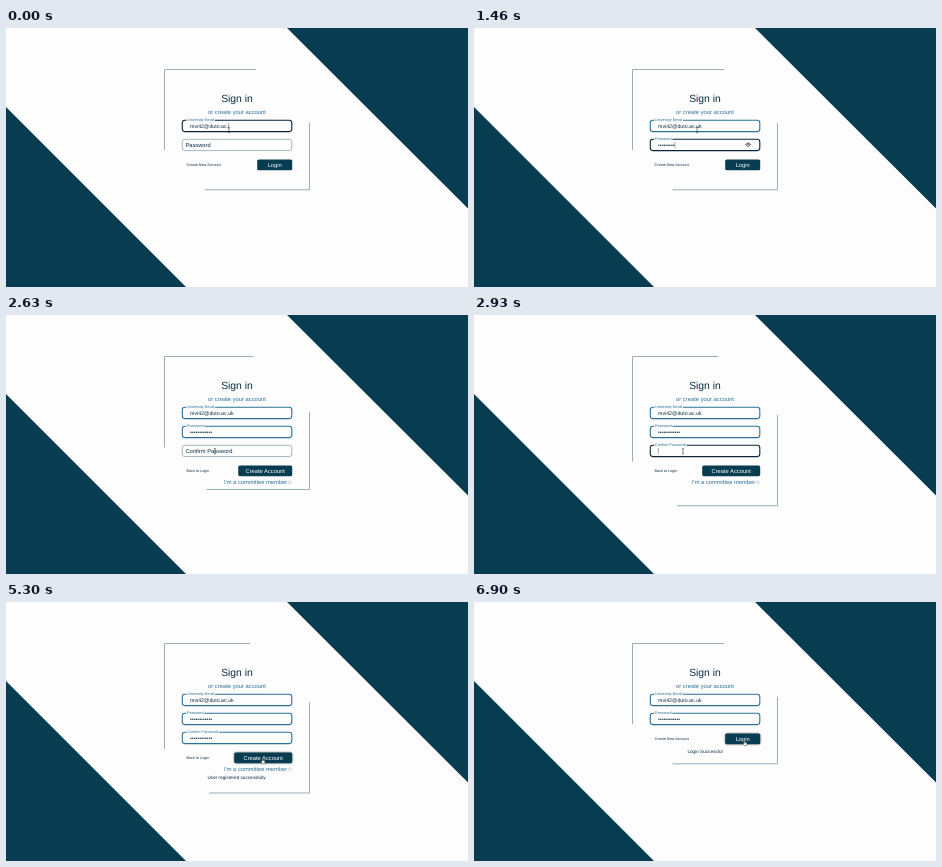
Recreate the animation shown at these times as an HTML page. Size 462 by 259 pixels, loop 7300 ms.

```html
<!DOCTYPE html>
<html lang="en">
<head>
<meta charset="utf-8">
<title>Sign in</title>
<style>
html, body { margin: 0; width: 100%; height: 100%; overflow: hidden; background: #fdfdfd; }
svg { display: block; width: 462px; height: 259px; }
text { font-family: "Liberation Sans", Arial, sans-serif; fill: #0a2f42; text-rendering: geometricPrecision; white-space: pre; }
.blue { fill: #2c7099; }
.mid { text-anchor: middle; }
.label { paint-order: stroke; stroke: #fdfdfd; stroke-width: 2; }
.hover { filter: drop-shadow(0 .8px 1px #0008); }
</style>
</head>
<body>
<svg viewBox="0 0 462 259">
  <path d="M281 0H462V180.500ZM0 79L180 259H0Z" fill="#083c50"/>
  <path id="frame" fill="none" stroke="#8fa6b3" stroke-width=".9"/>
  <text class="mid" x="231" y="74.200" font-size="10.350">Sign in</text>
  <text class="mid blue" x="231" y="86" font-size="5.820">or create your account</text>
  <g id="fields"></g>
  <text id="link" x="180.500" font-size="3.750"></text>
  <rect id="button" height="10.700" rx="1.600" fill="#083c50"/>
  <text id="action" class="mid" font-size="5.780" style="fill:#fff"></text>
  <g id="member">
    <text class="blue" x="218" y="169.400" font-size="5.750">I'm a committee member</text>
    <rect x="282.600" y="166.200" width="2.500" height="2.500" rx=".6" fill="#fff" stroke="#8a9aa5" stroke-width=".4"/>
  </g>
  <text id="message" class="mid" x="231" font-size="4.650"></text>
  <path id="cursor" stroke-linejoin="round"/>
</svg>
<script>
const LOOP = 7300, REGISTER = 2500, BACK = 6030;
const $ = id => document.getElementById(id);
const set = (el, attrs) => { for (const k in attrs) el.setAttribute(k, attrs[k]); };
const clamp = v => Math.min(1, Math.max(0, v));
const mix = (a, b, p) => a + (b - a) * p;

// CSS "ease": cubic-bezier(.25, .1, .25, 1)
function ease(x) {
  x = clamp(x);
  const curve = (a, b, s) => 3 * a * s * (1 - s) ** 2 + 3 * b * s * s * (1 - s) + s ** 3;
  let lo = 0, hi = 1;
  for (let i = 0; i < 22; i++) {
    const s = (lo + hi) / 2;
    if (curve(.25, .25, s) < x) lo = s; else hi = s;
  }
  return curve(.1, 1, lo);
}

const dots = "•".repeat(12);
const specs = [
  { label: "University Email", value: "mvi42@duto.ac.uk", focus: -200, blur: 330,
    keys: [...Array(14).fill(-60), 100, 260] },
  { label: "Password", value: dots, focus: 330, blur: REGISTER, float: 200, secret: true,
    keys: [730, 800, 860, 1030, 1100, 1160, 1230, 1300, 1460, 1510, 1560, 1760] },
  { label: "Confirm Password", value: dots, focus: 2640, blur: 5030, float: 120, secret: true,
    keys: [3030, 3100, 3160, 3460, 3530, 3600, 3600, 3660, 3900, 3930, 3960, 4160] }
];

const fields = specs.map((spec, i) => {
  const y = 92.3 + i * 19;
  const g = document.createElementNS("http://www.w3.org/2000/svg", "g");
  g.innerHTML = `<rect x="176.300" y="${y}" width="109.500" height="11.300" rx="2.500" fill="none"/>
    <text class="label">${spec.label}</text>
    <text x="184" y="${y + 7.5}" font-size="5.270"></text>
    <path stroke="#456" stroke-width=".5"/>
    <g fill="none" stroke="#222" stroke-width=".7" transform="translate(274.200 ${y + 5.4})">
      <path d="M-3 .4Q0-3.800 3 .4"/><circle cy=".5" r="1.300"/></g>`;
  $("fields").append(g);
  const [box, label, value, caret, eye] = g.children;
  return { ...spec, y, g, box, label, value, caret, eye };
});

function drawField(f, t) {
  const focused = t >= f.focus && t < f.blur;
  const p = 1 - (1 - clamp((t - f.focus) / (f.float || 1))) ** 3;
  const typed = f.keys.filter(k => k <= t).length;
  set(f.box, {
    stroke: focused ? "#0a2638" : typed ? "#2a7398" : "#8fa5b0",
    "stroke-width": focused || typed ? 1.1 : .8
  });
  set(f.label, { x: mix(179.4, 181, p), y: mix(f.y + 7.6, f.y + .9, p), "font-size": mix(5.78, 3.8, p) });
  f.label.style.fill = p > .3 ? "#2c7099" : "#0a2f42";
  f.value.textContent = f.value_ = f.textAt(typed);
  const last = typed ? f.keys[typed - 1] : f.focus;
  const x = 184.3 + (typed ? f.value.getComputedTextLength() : 0);
  set(f.caret, {
    d: `M${x} ${f.y + 2.6}v6`,
    visibility: focused && (t - last) % 1000 < 500 ? "inherit" : "hidden"
  });
  set(f.eye, { visibility: f.secret && focused && typed ? "inherit" : "hidden" });
}
for (const f of fields) {
  const full = specs[fields.indexOf(f)].value;
  f.textAt = n => full.slice(0, n);
}

// time, x, y of the pointer's hot spot
const path = [
  [0, 223, 102], [2030, 223, 102], [2440, 206, 136.5], [2500, 206, 136.5],
  [2620, 209, 136.2], [4460, 209, 136.5], [5030, 256.5, 156.5], [5460, 256.5, 156.5],
  [5830, 182.5, 154], [6190, 182.5, 154], [6620, 270.5, 138.5], [LOOP, 270.5, 138.5]
];
function pointer(t) {
  const i = path.findIndex(k => k[0] > t);
  const [a, b] = [path[i - 1], path[i]];
  const u = (t - a[0]) / (b[0] - a[0]), p = u * u * (3 - 2 * u);
  return [mix(a[1], b[1], p), mix(a[2], b[2], p)];
}

const shapes = {
  beam: { d: "M-.8-2.600H.8M0-2.600V2.600M-.8 2.600H.8", fill: "none", stroke: "#333", "stroke-width": .6 },
  arrow: { d: "M0 0V4.200L1 3.300 1.700 4.900 2.400 4.600 1.700 3.100H3Z", fill: "#fff", stroke: "#222", "stroke-width": .5 },
  hand: { d: "M-.4 0H.4V1.800L2.400 2.300V4L1.800 5.200H-.2L-1.800 3.200-1.300 2.700-.4 3.400Z", fill: "#fff", stroke: "#222", "stroke-width": .4 }
};

function draw(now) {
  const t = now % LOOP;
  const creating = t >= REGISTER && t < BACK;
  const progress = ms => t < BACK ? ease((t - REGISTER) / ms) : 1 - ease((t - BACK) / ms);
  const grow = progress(500), wide = progress(250);
  const top = creating ? 150.5 : 131.6;

  const bottom = 161.8 + 29.2 * grow;
  set($("frame"), { d: `M158.500 ${122 + 25 * grow}V41.500H${250 - 6 * grow}
    M303.500 ${95 + 5 * grow}V${bottom}H${198.500 + 4.500 * grow}` });

  for (const f of fields) drawField(f, t);
  set(fields[2].g, { visibility: creating ? "visible" : "hidden" });
  set($("member"), { visibility: creating ? "visible" : "hidden" });

  const width = mix(35, 58, wide), left = 286.2 - width;
  $("link").textContent = creating ? "Back to Login" : "Create New Account";
  set($("link"), { y: top + 6.3 });
  set($("button"), { x: left, y: top, width });
  $("action").textContent = creating ? "Create Account" : "Login";
  set($("action"), { x: left + width / 2, y: top + 7.4 });

  $("message").textContent = t >= 6900 ? "Login Successful"
    : t >= 5300 && creating ? "User registered successfully." : "";
  set($("message"), { y: t >= 6900 ? 151.1 : 176.5 });

  const [x, y] = pointer(t);
  const inside = (l, u, w, h) => x >= l && x <= l + w && y >= u && y <= u + h;
  const onButton = inside(left, top, width, 10.7);
  const onLink = inside(180, top + 2, creating ? 24 : 35, 6);
  const onField = fields.some((f, i) => (i < 2 || creating) && inside(176, f.y, 110, 11.3));
  set($("button"), { class: onButton ? "hover" : "" });
  set($("cursor"), {
    ...shapes[onField ? "beam" : onButton || onLink ? "hand" : "arrow"],
    transform: `translate(${x} ${y})`
  });
}

const start = performance.now();
function tick() {
  draw(performance.now() - start);
  requestAnimationFrame(tick);
}
tick();
</script>
</body>
</html>
```
